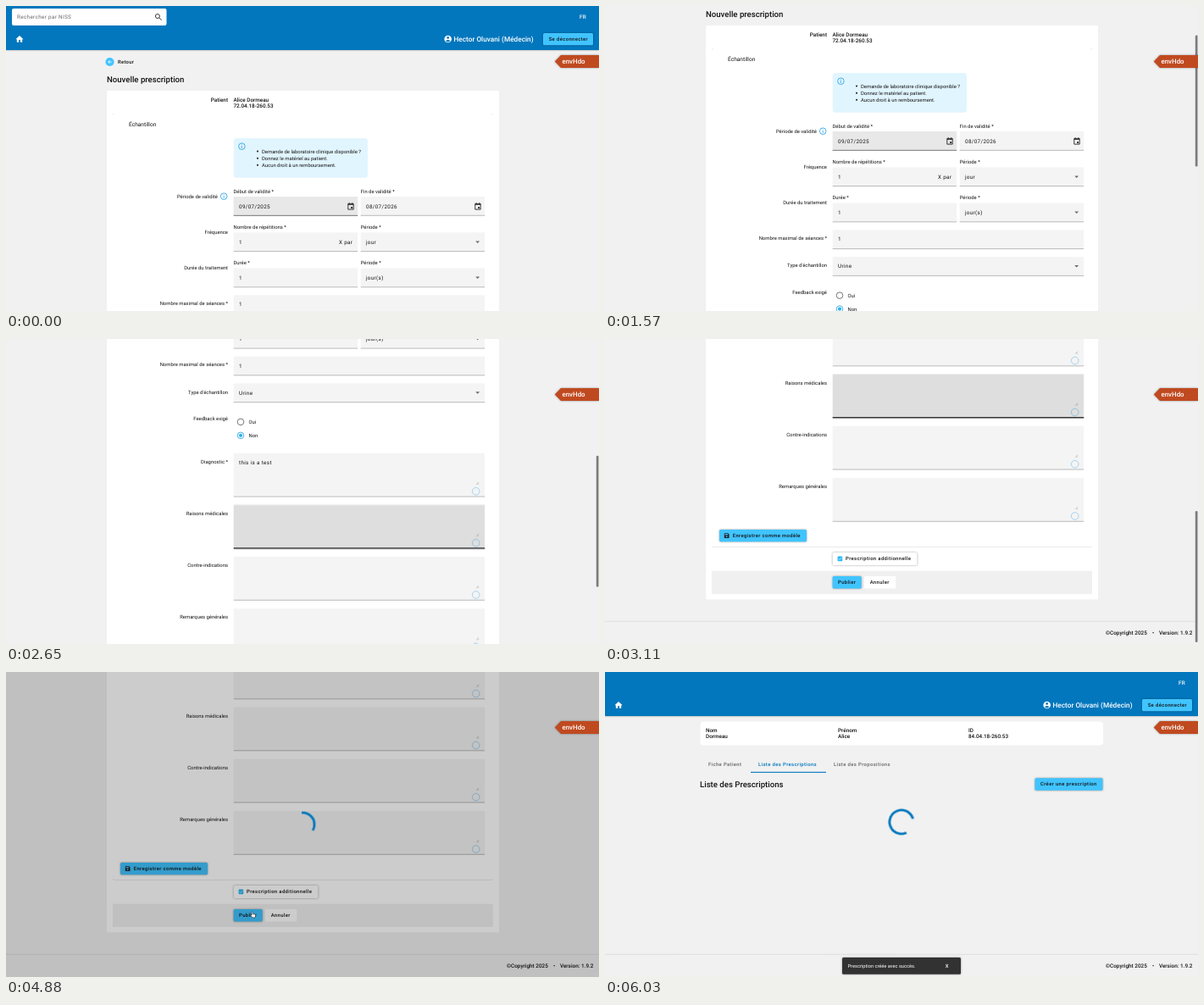
An HTML page that plays this animation: 700x360 px, repeating every 6.13 s.

```html
<!DOCTYPE html>
<html lang="fr">
<head>
<meta charset="utf-8">
<title>Nouvelle prescription</title>
<style>
@property --s { syntax: "<number>"; inherits: true; initial-value: 0; }
html, body { margin: 0; width: 100%; height: 100%; overflow: hidden; background: #f1f1f1; }
svg { display: block; }
#stage { width: 100vw; height: 100vh; font: 5.9px Roboto, Arial, sans-serif; text-rendering: geometricPrecision; fill: #151515; animation: scroll 6130ms linear infinite; }
.anim { animation: 6130ms linear infinite; }
.end { text-anchor: end; }
.mid { text-anchor: middle; }
.h { font-size: 9.6px; font-weight: 500; }
.b { font-size: 6.35px; font-weight: 500; }
.v { font-size: 6.3px; letter-spacing: .35px; }
.btn { font-weight: 500; letter-spacing: .37px; }
.foot { font-size: 6.4px; font-weight: 500; }
.white { fill: #fff; }
.field { fill: #f4f4f4; }
.line { stroke: #a0a0a0; stroke-width: .7; }
.blue { fill: #40c4ff; }
.icon { fill: none; stroke: #222; stroke-width: .9; }
.info { fill: none; stroke: #1e9be0; stroke-width: .8; }
.shade { filter: drop-shadow(0 .7px .8px #0006); }
.arc { fill: none; stroke: #0277bd; stroke-width: 2.8; }

#page { transform: translateY(calc(var(--s) * -1px)); }
#thumb { transform: translateY(calc(var(--s) * .423px)); }
#bar { animation-name: bar; }
#first { animation-name: first; }
#second { animation-name: second; }
#hoverDate { animation-name: hoverDate; }
#hoverArea { animation-name: hoverArea; }
#hoverSend { animation-name: hoverSend; }
#hand { animation-name: hand; }
#dim { animation-name: dim; }
#spinA { animation-name: spinA; }
#spinB { animation-name: spinB; }
#snack { transform-box: fill-box; transform-origin: center; animation-name: snack; }

@keyframes scroll {
  0%, 19.41% { --s: 0; }
  21.21% { --s: 10; }
  23.49% { --s: 38; }
  25.61% { --s: 76.5; }
  28.22% { --s: 146; }
  30.18% { --s: 203; }
  32.63% { --s: 258; }
  35.89% { --s: 299; }
  39.48% { --s: 317; }
  41.11%, 43.23% { --s: 320.5; }
  44.37% { --s: 338; }
  45.68% { --s: 375; }
  48.12% { --s: 442; }
  50.73%, 99.99% { --s: 475; }
  100% { --s: 0; }
}
@keyframes bar {
  0%, 19.4% { opacity: 0; }
  19.41%, 54.5% { opacity: 1; }
  58.5%, 100% { opacity: 0; }
}
@keyframes first { 0%, 82.53% { visibility: visible; } 82.54%, 100% { visibility: hidden; } }
@keyframes second { 0%, 82.53% { visibility: hidden; } 82.54%, 100% { visibility: visible; } }
@keyframes hoverDate { 0%, 39.47% { opacity: 1; } 39.48%, 100% { opacity: 0; } }
@keyframes hoverArea { 0%, 39.47% { opacity: 0; } 39.48%, 60.19% { opacity: 1; } 60.2%, 100% { opacity: 0; } }
@keyframes hoverSend { 0%, 64.4% { opacity: 0; } 64.41%, 68.5% { opacity: 1; } 69.7%, 100% { opacity: 0; } }
@keyframes hand { 0%, 64.4% { opacity: 0; } 64.41%, 100% { opacity: 1; } }
@keyframes dim { 0%, 68.5% { opacity: 0; } 69.7%, 100% { opacity: 1; } }
@keyframes spinA {
  0%, 68.5% { transform: rotate(-391deg); stroke-dasharray: 125 360; }
  74.2% { transform: rotate(-311deg); stroke-dasharray: 265 360; }
  79.6% { transform: rotate(-95deg); stroke-dasharray: 125 360; }
  82.54%, 100% { transform: rotate(16deg); stroke-dasharray: 55 360; }
}
@keyframes spinB {
  0%, 82.54% { transform: rotate(-273deg); stroke-dasharray: 125 360; }
  87.5% { transform: rotate(-88deg); stroke-dasharray: 10 360; }
  98.37% { transform: rotate(65deg); stroke-dasharray: 280 360; }
  100% { transform: rotate(95deg); stroke-dasharray: 272 360; }
}
@keyframes snack {
  0%, 84.2% { opacity: 0; transform: scale(.8); }
  86.6%, 100% { opacity: 1; transform: none; }
}
</style>
</head>
<body>
<svg id="stage" viewBox="0 0 700 360" preserveAspectRatio="none">
  <defs>
    <g id="half"><rect class="field" width="146.5" height="22.3"/><path class="line" d="M0 22.3h146.5"/></g>
    <g id="wide"><rect class="field" width="296.5" height="22.3"/><path class="line" d="M0 22.3h296.5"/></g>
    <g id="area">
      <rect class="field" width="296.5" height="51.3"/><path class="line" d="M0 51.3h296.5"/>
      <path d="M286.5 37l2.8-2.8M288.2 37.2l1.2-1.2" stroke="#888" stroke-width=".5"/>
      <circle class="info" cx="286" cy="45" r="4.3" style="stroke:#8ecbee"/>
    </g>
    <g id="cal"><path class="icon" d="M-3.2-3H3.2V3.7H-3.2ZM-3.2-2H3.2M-1.8-4.3V-3M1.8-4.3V-3"/><rect x=".2" y=".7" width="1.9" height="1.9" fill="#222"/></g>
    <path id="drop" d="M-2.4-1.2H2.4L0 1.3Z" fill="#666"/>
    <g id="i"><circle class="info" r="3.8"/><path class="info" d="M0-2.1v.8M0-.5V2.1"/></g>
    <g id="top">
      <rect class="shade" width="700" height="52" fill="#0277bd"/>
      <text class="v white" x="677" y="15.2" font-weight="500">FR</text>
      <path class="white" d="M16 35l4.6 4.2h-1.4V42.8h-2.3V40h-1.8v2.8h-2.3V39.2h-1.4Z"/>
      <circle class="white" cx="521.7" cy="39" r="4.3"/>
      <g fill="#0277bd"><circle cx="521.7" cy="37.4" r="1.4"/><path d="M519 41.2q2.7-2.6 5.4 0q-2.7 2.6-5.4 0"/></g>
      <text class="white" x="528.5" y="42" font-size="8.25" font-weight="500">Hector Oluvani (Médecin)</text>
      <rect class="blue shade" x="634" y="32" width="59" height="14.3" rx="1.5"/>
      <text class="btn" x="640.7" y="41.2">Se déconnecter</text>
    </g>
    <g id="bottom">
      <path d="M0 333.3H700" stroke="#dadada" stroke-width=".8"/>
      <text class="foot" x="591" y="349.2">©Copyright 2025</text>
      <text class="foot mid" x="647" y="349.2">•</text>
      <text class="foot end" x="693.5" y="349.2">Version: 1.9.2</text>
    </g>
  </defs>

  <rect width="700" height="360" fill="#f1f1f1"/>

  <g id="first" class="anim">
    <g id="page">
      <use href="#top"/>
      <rect class="white" x="7" y="3" width="182.5" height="20" rx="2"/>
      <text class="v" x="13" y="15.2" fill="#666">Rechercher par NISS</text>
      <g class="icon" stroke-width="1.2"><circle cx="178.9" cy="12" r="2.5"/><path d="M180.8 13.9l2.9 2.9"/></g>

      <circle class="blue" cx="122.5" cy="66" r="5.1"/>
      <path d="M124.7 66h-4M122.4 64.2L120.6 66l1.8 1.8" fill="none" stroke="#fff" stroke-width=".8"/>
      <text x="132" y="68" font-weight="500" letter-spacing=".3">Retour</text>
      <text class="h" x="119" y="90.2">Nouvelle prescription</text>

      <rect class="white" x="119" y="100" width="463" height="682.3"/>
      <text class="b end" x="262" y="112.8">Patient</text>
      <text class="b" x="268.5" y="112.8">Alice Dormeau</text>
      <text class="b" x="268.5" y="120.3">72.04.18-260.53</text>

      <rect class="white" x="126" y="127" width="449" height="593.5" rx="2" style="filter:drop-shadow(0 .6px .7px #0005)"/>
      <text x="145" y="142" font-size="6.6">Échantillon</text>
      <rect x="268.7" y="156" width="158.3" height="46.7" rx="3.5" fill="#e1f5fe"/>
      <use href="#i" x="278.4" y="165.7"/>
      <g><circle cx="297" cy="171.6" r="1"/><circle cx="297" cy="179.7" r="1"/><circle cx="297" cy="187.7" r="1"/></g>
      <text x="302" y="173.6">Demande de laboratoire clinique disponible ?</text>
      <text x="302" y="181.7">Donnez le matériel au patient.</text>
      <text x="302" y="189.7">Aucun droit à un remboursement.</text>

      <g class="end">
        <text x="250" y="227.2">Période de validité</text>
        <text x="262" y="269.2">Fréquence</text>
        <text x="262" y="311.3">Durée du traitement</text>
        <text x="262" y="353.1">Nombre maximal de séances *</text>
        <text x="262" y="385.4">Type d'échantillon</text>
        <text x="262" y="416.9">Feedback exigé</text>
        <text x="262" y="467.5">Diagnostic *</text>
        <text x="262" y="528.6">Raisons médicales</text>
        <text x="262" y="589.6">Contre-indications</text>
        <text x="262" y="650.6">Remarques générales</text>
      </g>
      <use href="#i" x="257.2" y="224.7"/>

      <text x="268.5" y="220.7">Début de validité *</text>
      <text x="418.7" y="220.7">Fin de validité *</text>
      <use href="#half" x="268.7" y="225"/>
      <g id="hoverDate" class="anim"><rect x="268.7" y="225" width="146.5" height="22.3" fill="#e8e8e8"/><path d="M268.7 247.3h146.5" stroke="#666" stroke-width=".8"/></g>
      <use href="#half" x="418.7" y="225"/>
      <text class="v" x="275" y="238.7">09/07/2025</text>
      <text class="v" x="425" y="238.7">08/07/2026</text>
      <use href="#cal" x="407" y="236.4"/>
      <use href="#cal" x="557" y="236.4"/>

      <text x="268.5" y="263">Nombre de répétitions *</text>
      <text x="418.7" y="263">Période *</text>
      <use href="#half" x="268.7" y="267.3"/>
      <use href="#half" x="418.7" y="267.3"/>
      <text class="v" x="275" y="280.6">1</text>
      <text class="v end" x="409.3" y="280.6">X par</text>
      <text class="v" x="425" y="280.6">jour</text>
      <use href="#drop" x="556.7" y="278.6"/>

      <text x="268.5" y="305.2">Durée *</text>
      <text x="418.7" y="305.2">Période *</text>
      <use href="#half" x="268.7" y="309.5"/>
      <use href="#half" x="418.7" y="309.5"/>
      <text class="v" x="275" y="322.8">1</text>
      <text class="v" x="425" y="322.8">jour(s)</text>
      <use href="#drop" x="556.7" y="320.8"/>

      <use href="#wide" x="268.7" y="341.3"/>
      <text class="v" x="275" y="354.4">1</text>
      <use href="#wide" x="268.7" y="373.1"/>
      <text class="v" x="275" y="386.4">Urine</text>
      <use href="#drop" x="556.7" y="384.3"/>

      <circle class="icon" cx="277" cy="418.6" r="3.8" style="stroke:#555;stroke-width:.8"/>
      <circle class="info" cx="277" cy="434.6" r="3.8"/>
      <circle cx="277" cy="434.6" r="2.1" fill="#29b0f0"/>
      <text x="286.5" y="420.7">Oui</text>
      <text x="286.5" y="436.7">Non</text>

      <use href="#area" x="268.7" y="455.5"/>
      <text class="v" x="275" y="468.7">this is a test</text>
      <g id="hoverArea" class="anim"><rect x="268.7" y="516.5" width="296.5" height="51.3" fill="#e8e8e8"/><path d="M268.7 567.8h296.5" stroke="#444" stroke-width="1.4"/></g>
      <g style="mix-blend-mode:multiply"><use href="#area" x="268.7" y="516.5"/></g>
      <use href="#area" x="268.7" y="577.7"/>
      <use href="#area" x="268.7" y="639"/>

      <rect class="blue shade" x="135" y="700" width="103" height="14.3" rx="1.5"/>
      <path d="M140.8 704.3h4.4l1.3 1.3v4.3h-5.7Z" fill="#222"/>
      <path class="blue" d="M141.6 705h3.3v1.4h-3.3Z"/><circle class="blue" cx="143.6" cy="708.2" r=".9"/>
      <text class="btn" x="150.7" y="709.1">Enregistrer comme modèle</text>

      <rect class="white shade" x="268.7" y="727" width="99.7" height="15" rx="1.5"/>
      <rect x="274.6" y="731.6" width="5.6" height="5.6" rx=".8" fill="#29b6f6"/>
      <path d="M275.8 734.4l1.2 1.2 2.2-2.4" fill="none" stroke="#fff" stroke-width=".7"/>
      <text class="btn" x="284" y="736.4">Prescription additionnelle</text>

      <rect x="126" y="748.7" width="449" height="27.3" fill="#f0f0f0"/>
      <rect class="blue shade" x="268.7" y="755" width="34" height="14.5" rx="1.5"/>
      <rect id="hoverSend" class="anim" x="268.7" y="755" width="34" height="14.5" rx="1.5" fill="#35a3d6"/>
      <text class="btn" x="275" y="764.2">Publier</text>
      <rect class="white" x="306" y="755" width="37.3" height="14.5" rx="1.5"/>
      <text class="btn" x="312.7" y="764.2">Annuler</text>
      <use href="#bottom" y="475"/>
    </g>

    <g id="bar" class="anim"><rect id="thumb" x="696.8" y="2" width="2.7" height="155" rx="1.3" fill="#7c7c7c"/></g>
    <g id="dim" class="anim">
      <rect width="700" height="360" fill="#000" opacity=".2"/>
      <g transform="translate(350 180)"><circle id="spinA" class="arc anim" r="14" pathLength="360"/></g>
    </g>
    <path id="hand" class="anim" d="M289.8 283.4q.8-.8 1.4.2l.3 2 2.3.5q1 .3.8 1.4l-.6 2.4h-3l-2.2-2.7q.2-1 1.4-.2Z" fill="#fff" stroke="#222" stroke-width=".6"/>
  </g>

  <g id="second" class="anim">
    <rect width="700" height="360" fill="#f1f1f1"/>
    <use href="#top"/>
    <rect class="white" x="112.5" y="58.5" width="475.5" height="28" rx="4"/>
    <g class="b">
      <text x="119" y="71">Nom</text><text x="119" y="78.4">Dormeau</text>
      <text x="275" y="71">Prénom</text><text x="275" y="78.4">Alice</text>
      <text x="429" y="71">ID</text><text x="429" y="78.4">84.04.18-260.53</text>
    </g>
    <g class="btn" fill="#666">
      <text x="122" y="110.6">Fiche Patient</text>
      <text x="181" y="110.6" fill="#0277bd">Liste des Prescriptions</text>
      <text x="270" y="110.6">Liste des Propositions</text>
    </g>
    <rect x="172" y="117.8" width="89" height="1.1" fill="#0277bd"/>
    <text class="h" x="112" y="135.5">Liste des Prescriptions</text>
    <rect class="blue shade" x="507.5" y="125.3" width="80" height="14.5" rx="1.5"/>
    <text class="btn" x="514" y="134.4">Créer une prescription</text>
    <g transform="translate(350 177)"><circle id="spinB" class="arc anim" r="14" pathLength="360"/></g>
    <use href="#bottom"/>
    <g id="snack" class="anim">
      <rect class="shade" x="280" y="337" width="140" height="19.7" rx="1.5" fill="#323232"/>
      <text class="white" x="286.5" y="348.8" font-size="5.7">Prescription créée avec succès.</text>
      <text class="white mid" x="403.7" y="348.8" font-weight="500">X</text>
    </g>
  </g>

  <path class="shade" d="M647.8 65.4L655 58H700V73H655Z" fill="#c04a20"/>
  <text x="656.5" y="68" fill="#fff" font-size="7.9" font-weight="500">envHdo</text>
</svg>
</body>
</html>
```
